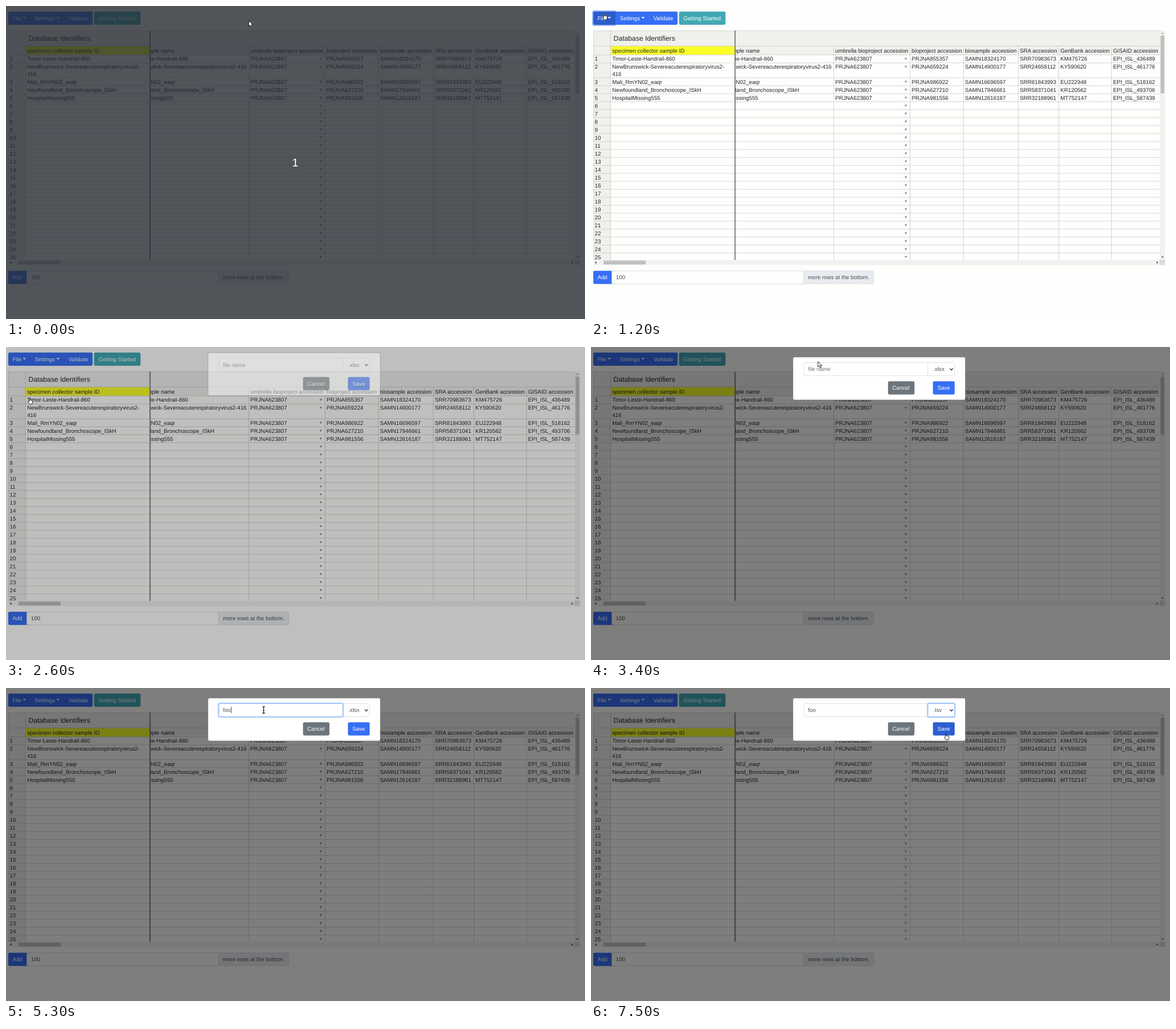
An HTML page for the animation above (8000 ms loop, 1018 by 550 pixels).

```html
<!DOCTYPE html>
<html lang="en">
<head>
<meta charset="utf-8">
<title>Save spreadsheet as</title>
<style>
  html, body { margin: 0; width: 100%; height: 100%; overflow: hidden; background: #fefefc; }
  svg { display: block; width: 1018px; height: 550px; }
  text {
    font: 9.76px "Liberation Sans", Arial, sans-serif;
    text-rendering: geometricPrecision;
    fill: #212529;
    white-space: pre;
  }
  .light { fill: #fff; }
  .field { fill: #495057; }
  .hint { fill: #6c757d; }
  .title { font-size: 12.2px; }
  .count { font-size: 20px; fill: #fff; text-anchor: middle; }
</style>
</head>
<body>
<svg viewBox="0 0 1018 550">
  <defs>
    <clipPath id="table"><rect x="4" y="43" width="996" height="403"/></clipPath>
    <clipPath id="scrolled"><rect x="254" y="43" width="746" height="403"/></clipPath>
  </defs>
  <g id="page"></g>
  <g id="live"></g>
</svg>
<script>
const LOOP = 8000, STEP = 100;
const BLUE = '#366ff4', DARK_BLUE = '#2b5cc9', TEAL = '#41a8b3', GRAY = '#6c757d';
const GRID = '#c8c8c8', HEAD = '#f0f0ed', PAPER = '#fefefc', EDGE = '#ced4da';

const rect = (x, y, w, h, fill, more = '') =>
  `<rect x="${x}" y="${y}" width="${w}" height="${h}" fill="${fill}" ${more}/>`;
const round = (x, y, w, h, fill, more = '') => rect(x, y, w, h, fill, `rx="2.4" ${more}`);
const text = (x, y, s, cls = '') => `<text x="${x}" y="${y}" class="${cls}">${s}</text>`;
const path = (d, more) => `<path d="${d}" ${more}/>`;
const lines = (d, color = GRID, w = 0.8) =>
  path(d, `fill="none" stroke="${color}" stroke-width="${w}"`);
const tri = (x, y, w, h, fill) =>
  path(`M${x - w / 2} ${y - h / 2}h${w}l${-w / 2} ${h}z`, `fill="${fill}"`);
const turned = (angle, x, y, fill) =>
  `<g transform="translate(${x} ${y}) rotate(${angle})">${tri(0, 0, 4.4, 2.4, fill)}</g>`;
const border = color => `stroke="${color}" stroke-width=".7"`;

const columns = [
  [429.6, 'umbrella bioproject accession', Array(5).fill('PRJNA623807')],
  [563.8, 'bioproject accession',
    ['PRJNA855357', 'PRJNA659224', 'PRJNA986922', 'PRJNA627210', 'PRJNA981556']],
  [657.6, 'biosample accession',
    ['SAMN18324170', 'SAMN14900177', 'SAMN16696597', 'SAMN17946661', 'SAMN12616187']],
  [754, 'SRA accession',
    ['SRR70983673', 'SRR24658112', 'SRR81843993', 'SRR58371041', 'SRR32188961']],
  [825.2, 'GenBank accession', ['KM475726', 'KY590620', 'EU222948', 'KR120562', 'MT752147']],
  [918, 'GISAID accession',
    ['EPI_ISL_436489', 'EPI_ISL_461776', 'EPI_ISL_518162', 'EPI_ISL_493706', 'EPI_ISL_587439']]
];
const samples = ['Timor-Leste-Handrail-860', 'NewBrunswick-Severeacuterespiratoryvirus2-416',
  'Mali_RmYN02_eaqr', 'Newfoundland_Bronchoscope_ISkH', 'HospitalMissing555'];

// The second row is taller because its sample ID wraps.
const rowTop = i => i < 2 ? 86 + 14 * i : 126.1 + 14 * (i - 2);
const baseline = i => rowTop(i) + 10.4;

function drawTable() {
  let fixed = rect(4, 43, 996, 403, PAPER) + rect(4, 43, 996, 43, HEAD) + rect(4, 43, 30.4, 403, HEAD);
  let scrolled = text(238.1, 81.6, 'sample name');
  let grid = 'M4 43.3H1000M4 70.2H1000M4 86H1000M4.3 43V446M34.4 43V446';

  fixed += rect(34.8, 70.6, 218, 15.2, '#faff28');
  for (let i = 0; i < 25; i++) {
    grid += `M4 ${rowTop(i + 1)}H1000`;
    fixed += text(6.6, baseline(i), i + 1);
    scrolled += tri(553.5, rowTop(i) + 7.2, 4.2, 3.8, '#858585');
  }
  samples.forEach((name, i) => {
    scrolled += text(209.5, baseline(i), name);
    const cut = i === 1 ? name.length - 3 : name.length;
    fixed += text(37.2, baseline(i), name.slice(0, cut));
    if (i === 1) fixed += text(37.2, baseline(i) + 12.8, name.slice(cut));
  });
  for (const [x, head, cells] of columns) {
    grid += `M${x - 2.7} 70V446`;
    scrolled += text(x, 81.6, head) + cells.map((c, i) => text(x, baseline(i), c)).join('');
  }
  fixed += text(39.6, 61.2, 'Database Identifiers', 'title')
    + text(37.2, 81.6, 'specimen collector sample ID');
  return `<g clip-path="url(#table)">${fixed}${lines(grid)}</g>`
    + `<g clip-path="url(#scrolled)">${scrolled}</g>` + rect(252.4, 43, 1.8, 403, '#747474');
}

function drawScrollbars() {
  return rect(1000, 43, 9.3, 403, '#f1f1ef') + rect(4, 446, 996, 9.3, '#f1f1ef')
    + rect(1000, 446, 9.3, 9.3, '#dcdcdc')
    + rect(1001.4, 52, 6.6, 101.5, '#c1c1c1') + rect(22, 447.4, 74, 6.8, '#c1c1c1')
    + turned(180, 1004.8, 47.8, '#a3a3a3') + turned(0, 1004.8, 441.5, '#505050')
    + turned(90, 8.2, 450.8, '#303030') + turned(-90, 995.8, 450.8, '#303030');
}

function drawPage() {
  return rect(0, 0, 1018, 550, PAPER)
    + round(4, 9.8, 148.3, 23.2, BLUE) + round(154.8, 9.8, 81.7, 23.2, TEAL)
    + text(50.8, 24.6, 'Settings', 'light') + tri(91.4, 20.8, 5.8, 2.9, '#fff')
    + text(109.8, 24.6, 'Validate', 'light') + text(162.6, 24.6, 'Getting Started', 'light')
    + drawTable() + drawScrollbars()
    + round(4, 465.2, 40, 23.3, BLUE) + text(11.4, 480.2, 'Add', 'light')
    + round(366, 465.5, 131, 22.7, '#e9ecef', border(EDGE))
    + rect(36.6, 465.5, 337.2, 22.7, PAPER, border(EDGE))
    + text(43.8, 480.2, '100', 'field') + text(381.4, 480.2, 'more rows at the bottom.', 'field');
}

const ramp = (t, a, b) => Math.min(1, Math.max(0, (t - a) / (b - a)));
const within = (t, a, b) => t >= a && t < b;

function fileButton(t) {
  const open = within(t, 1100, 2600);
  const ring = within(t, 1200, 2400)
    ? round(3, 8.8, 41, 25.2, 'none', 'stroke="#366ff4" stroke-opacity=".5" stroke-width="2"') : '';
  return ring + (open ? round(4, 9.8, 39, 23.2, DARK_BLUE) : '')
    + text(11.4, 24.6, 'File', 'light') + tri(32.3, 20.8, 5.8, 2.9, '#fff');
}

function fileMenu(t) {
  if (!within(t, 1300, 2600)) return '';
  const active = t >= 2400 ? 2 : -1;
  return round(4.3, 34.4, 96.3, 88.4, '#fff', border('#d3d3d3'))
    + ['New', 'Open', 'Save As...', 'Export To...'].map((item, i) => {
      const y = 39.2 + 19.5 * i;
      return (i === active ? rect(4.6, y, 95.7, 19.5, BLUE) : '')
        + text(18.7, y + 13.2, item, i === active ? 'light' : '');
    }).join('');
}

const focusRing = (x, w, amount) => amount <= 0 ? '' : `<g opacity="${amount}">`
  + round(x - 1, 26.3, w + 2, 25.2, 'none', 'stroke="#c3dbfa" stroke-width="2"')
  + round(x, 27.4, w, 23, 'none', 'stroke="#80b4f8" stroke-width=".9"') + '</g>';

function nameField(t) {
  const typed = t < 4400 ? '' : t < 4900 ? 'f' : t < 5100 ? 'fo' : 'foo';
  const caretX = [382, 384.6, 390.1, 395.8][typed.length];
  const caret = within(t, 3800, 4300) || within(t, 4400, 5600) || t === 6000;
  return round(374.2, 27.4, 218, 23, '#fff', border(EDGE))
    + focusRing(374.2, 218, ramp(t, 3700, 3950) - ramp(t, 6000, 6200))
    + (typed ? text(381.5, 42.3, typed, 'field') : text(381.5, 42.3, 'file name', 'hint'))
    + (caret ? rect(caretX, 33, 0.8, 11.2, '#222') : '');
}

function dialog(t) {
  if (t < 2600) return '';
  const shown = ramp(t, 2500, 2700);
  const lift = -30 * (1 - shown) ** 2;
  return rect(0, 0, 1018, 550, '#000', `opacity="${shown / 2}"`)
    + `<g opacity="${shown}" transform="translate(0 ${lift})">`
    + rect(355, 17.6, 303.2, 75.5, '#fff', `rx="2.9" ${border('#666')}`)
    + round(588, 27.4, 51.3, 23, '#fff', border(EDGE))
    + nameField(t)
    + focusRing(592.4, 46.8, ramp(t, 6000, 6250))
    + text(601.8, 42.3, t < 7000 ? '.xlsx' : '.tsv', 'field')
    + lines('M631 37.8l2.6 2.7 2.6-2.7', '#333', 1.4)
    + round(522.2, 60.2, 46.5, 23.3, GRAY) + text(529.8, 75.3, 'Cancel', 'light')
    + round(601.2, 60.2, 38.2, 23.3, t < 7200 ? BLUE : t < 7500 ? '#2f63da' : '#2c5ed0')
    + text(608.9, 75.3, 'Save', 'light') + '</g>';
}

function formatList(t) {
  if (!within(t, 6200, 7000)) return '';
  const active = t < 6600 ? 0 : t < 6700 ? 1 : 2;
  return rect(593, 52, 48.5, 52, '#000', 'opacity=".15"')
    + rect(592.4, 51, 46.8, 51.2, '#fff', border('#aaa'))
    + ['.xlsx', '.xls', '.tsv', '.csv'].map((name, i) => {
      const on = i === active, y = 51 + 12.8 * i;
      return (on ? rect(592.7, y, 46.2, 12.8, BLUE) : '')
        + text(601.8, y + 9.7, name, on ? 'light' : 'field');
    }).join('');
}

const outlined = d => path(d, 'fill="#fff" stroke="#111" stroke-width=".9" stroke-linejoin="round"');
const pointers = {
  arrow: outlined('M0 0V9.6L2.3 7.6L4 11.4L5.7 10.6L4.1 7H7.1Z'),
  hand: outlined('M2.2 6V1Q2.9-.3 3.6 1V4Q4.7 3.3 5.2 4.3Q6.3 3.7 6.8 4.8Q8.1 4.4 8.1 5.8'
    + 'V8L7.1 11H2.9L.2 7.2Q.2 5.8 1.4 6.3Z'),
  beam: lines('M-2.4-6Q0-6 0-4.6Q0-6 2.4-6M0-5V5M-2.4 6Q0 6 0 4.6Q0 6 2.4 6M-1.3 1H1.3', '#111', 1.2)
};

const track = [
  [0, 427, 26, 'arrow'], [100, 413.5, 26], [900, 244, 26], [1000, 130, 20, 'hand'],
  [1100, 40, 15], [1200, 20.5, 13], [1300, 20.5, 18], [1500, 21, 53], [1600, 21, 53],
  [2000, 38.5, 89.5], [2800, 38.5, 89.5, 'arrow'], [3400, 399, 25.5], [3500, 413, 36, 'beam'],
  [3700, 427, 38.5], [5100, 440, 38.5], [5300, 453, 38.5], [5900, 596, 38.5, 'arrow'],
  [6100, 603, 42], [6400, 603, 42], [6800, 605, 82], [7000, 605, 82],
  [7200, 621, 80, 'hand'], [LOOP, 621, 80]
];

function pointer(t) {
  if (within(t, 4400, 5200)) return '';
  const next = track.findIndex(k => k[0] > t);
  const [t0, x0, y0] = track[next - 1], [t1, x1, y1] = track[next];
  const p = ramp(t, t0, t1);
  const shape = track.slice(0, next).reverse().find(k => k[3])[3];
  return `<g transform="translate(${x0 + (x1 - x0) * p} ${y0 + (y1 - y0) * p})">${pointers[shape]}</g>`;
}

const countdown = t => t >= 100 ? ''
  : rect(0, 0, 1018, 550, '#20262e', 'opacity=".78"') + text(508.5, 282, '1', 'count');

const live = document.getElementById('live');
document.getElementById('page').innerHTML = drawPage();

const start = performance.now();
let shownStep = -1;

function frame(now) {
  const t = Math.floor(Math.max(0, now - start) % LOOP / STEP) * STEP;
  if (t !== shownStep) {
    shownStep = t;
    live.innerHTML = [fileButton, fileMenu, dialog, formatList, countdown, pointer]
      .map(draw => draw(t)).join('');
  }
  requestAnimationFrame(frame);
}
frame(start);
</script>
</body>
</html>
```
